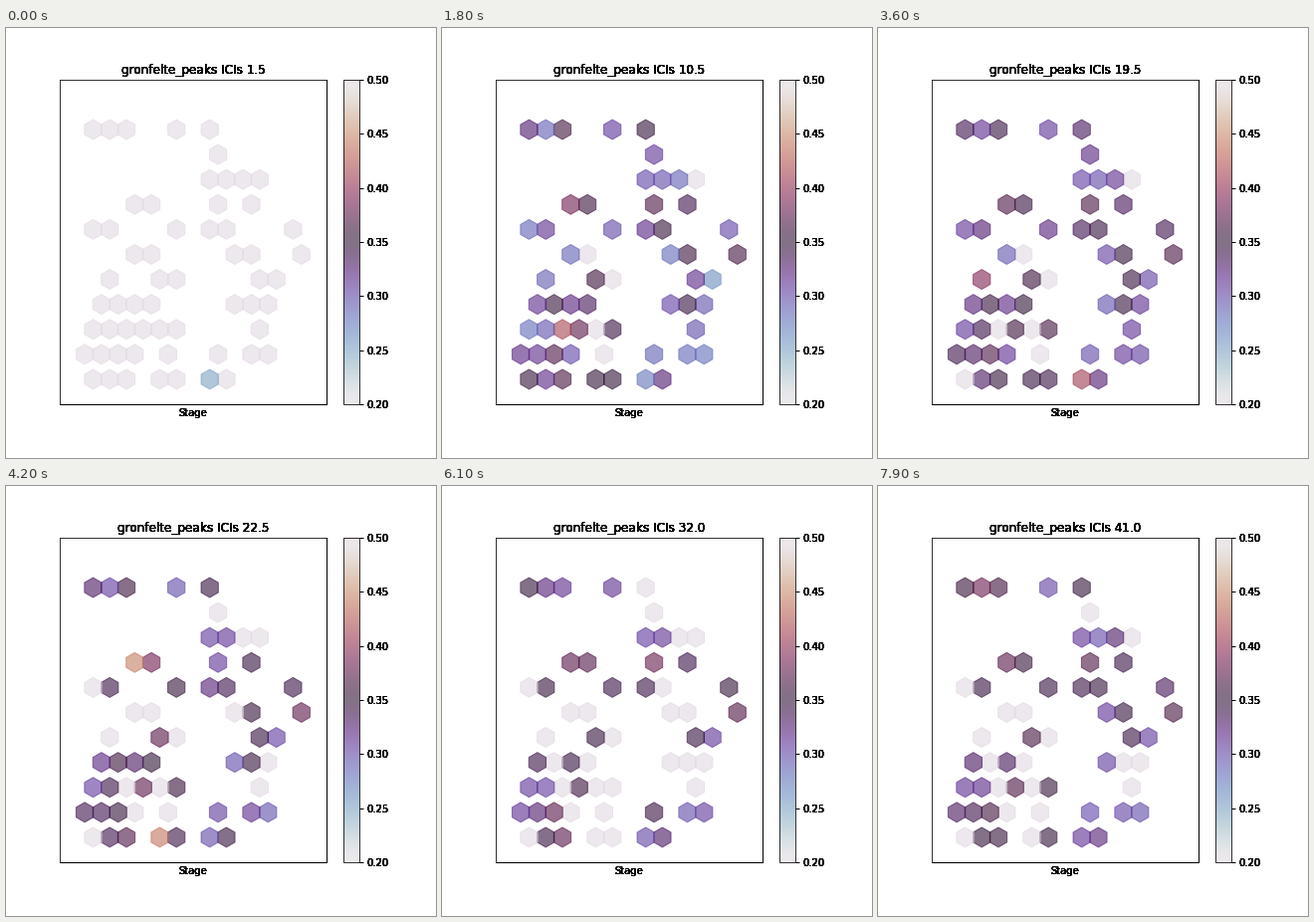
Write a matplotlib script that moves like this. It is 432 by 432 pixels and loops after 8000 ms.

```python
import numpy as np
import matplotlib.pyplot as plt
from matplotlib.animation import FuncAnimation

N, STEP_MS = 80, 100
LOW, HIGH = 20, 50  # hundredths of a second; LOW also means silent
plt.rcParams.update({"font.family": "DejaVu Sans", "font.size": 10,
                     "figure.subplot.bottom": 0.125})
rng = np.random.default_rng(7)

# (usual interval, start of a silent spell or None, {stage row: x positions})
GROUPS = [
    (LOW, None, {9: [12], 6: [5.5], 5: [7], 3: [4, 6], 2: [6.5], 1: [2]}),
    (29.5, None, {11: [3, 7], 9: [9, 10], 5: [13], 3: [2, 3],
                  2: [9.5, 11.5, 12.5], 1: [9]}),
    (32.5, None, {11: [2], 8: [11.5], 7: [3, 7, 9, 14], 5: [12],
                  4: [2.5, 4.5], 2: [1.5, 2.5], 1: [3, 10]}),
    (36.5, None, {11: [4], 8: [4.5, 5.5, 9.5], 6: [14.5], 5: [6], 3: [5],
                  2: [3.5], 1: [4]}),
    (30.5, 40, {10: [9.5], 9: [11], 7: [2], 6: [4.5, 10.5], 5: [3],
                4: [10.5, 12.5], 3: [12], 2: [4.5]}),
    (35, 55, {11: [9], 7: [10], 6: [11.5], 4: [3.5, 5.5, 11.5], 3: [7],
              1: [6, 7]}),
]
FIRST = (9, 1)  # the one heard from the very start


def wander():
    """Small random steps, each held for a few frames."""
    steps = rng.normal(0, 0.8, N)
    return np.repeat(steps, rng.integers(3, 9, N))[:N]


def course(usual, fade, first):
    """Interval of one hexagon in every frame."""
    k = np.arange(N)
    y = np.full(N, float(usual))
    if usual > LOW:
        y += wander()
        if usual < 34:
            y += 4 * np.sin(np.pi * k / 122) - 2.5
    if rng.random() < 0.7:
        a = rng.integers(10, N)
        y[a:a + rng.integers(6, 11)] = rng.uniform(25, 47)
    if fade:
        y[fade + rng.integers(-3, 4):rng.integers(68, 92)] = LOW
    start = 0 if first else rng.integers(1, 10)
    if usual > LOW:
        y[start:start + 4] = 25
    y[:start] = LOW
    return y


def crisp(axes, text, xy, offset, coords="axes fraction", **style):
    """Stack copies so the glyph edges turn solid."""
    return [axes.annotate(text, xy, offset, xycoords=coords,
                          textcoords="offset points", annotation_clip=False, **style)
            for _ in range(12)]


# right to left, so that each hexagon overlaps its right neighbour
cells = sorted(((x, row, usual, fade) for usual, fade, rows in GROUPS
                for row, xs in rows.items() for x in xs),
               key=lambda c: c[:2], reverse=True)
level = np.array([course(usual, fade, (x, row) == FIRST)
                  for x, row, usual, fade in cells]).T / 100

fig = plt.figure(figsize=(6, 6), dpi=72, facecolor="white")
ax = fig.add_subplot()
ax.set(xlim=(0, 16), ylim=(0, 13), xticks=[], yticks=[])
ax.spines[["right", "bottom"]].set_linewidth(1)
hexes = ax.scatter([c[0] for c in cells], [c[1] for c in cells], s=400, marker="h",
                   c=level[0], cmap="twilight", vmin=LOW / 100, vmax=HIGH / 100,
                   alpha=0.6)
bar = fig.colorbar(hexes, ax=ax)
ticks = np.arange(LOW, HIGH + 1, 5) / 100
bar.set_ticks(ticks, labels=[""] * len(ticks))
bar.ax.tick_params(width=1)

for v in ticks:
    crisp(bar.ax, f"{v:.2f}", (1, v), (7, 0), ("axes fraction", "data"),
          va="center_baseline")
crisp(ax, "Stage", (0.5, 0), (0, -4), ha="center", va="top")
titles = crisp(ax, "", (0.5, 1), (0, 6), ha="center", va="baseline", fontsize=12)


def draw(k):
    hexes.set_array(level[k])
    for t in titles:
        t.set_text(f"gronfelte_peaks ICIs {1.5 + 0.5 * k:.1f}")
    return [hexes, *titles]


anim = FuncAnimation(fig, draw, frames=N, interval=STEP_MS, repeat=True,
                     repeat_delay=0, blit=False)
plt.show()
```
